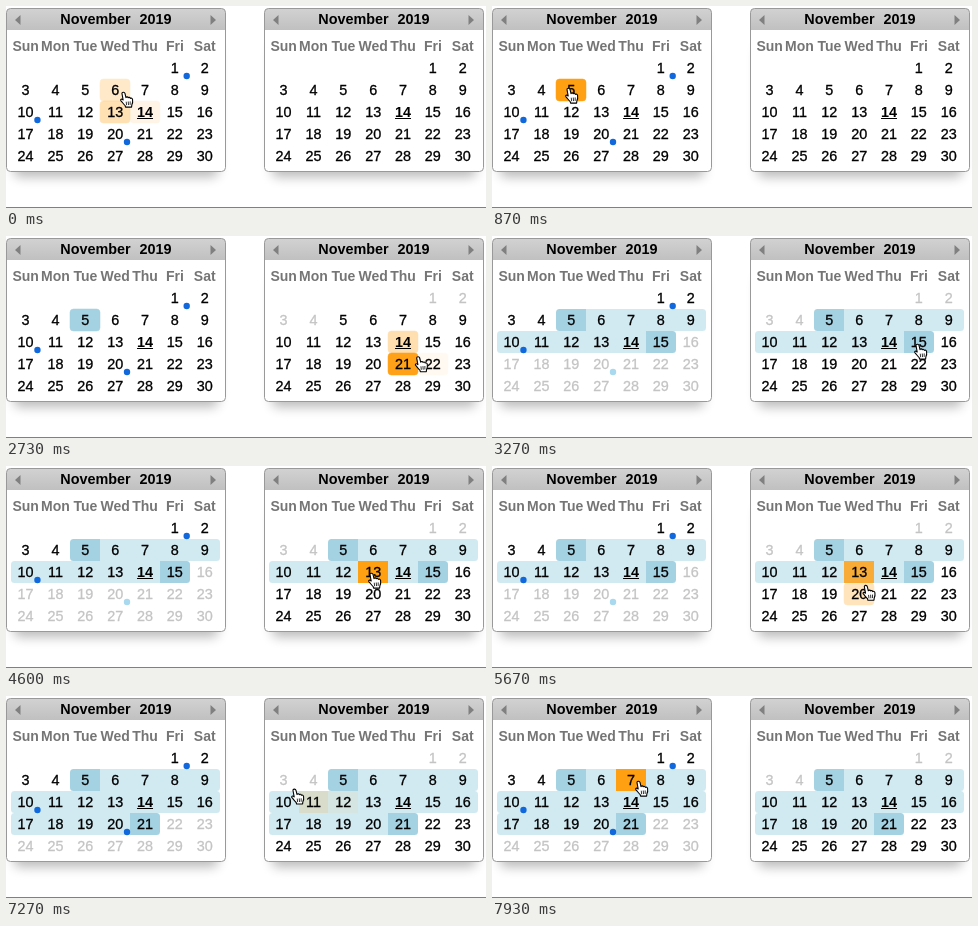
Animation of 480 by 202 pixels, one loop 8000 ms. Source, as an HTML page:

```html
<!DOCTYPE html>
<html lang="en">
<head>
<meta charset="utf-8">
<title>Date range picker</title>
<style>
  html, body { margin: 0; width: 100%; height: 100%; overflow: hidden; background: #fff; }
  svg { display: block; width: 480px; height: 202px; font: 14.4px "Liberation Sans", Arial, sans-serif; cursor: default; }
  text { text-anchor: middle; user-select: none; }
  .bold { font-weight: bold; }
  .day { stroke-width: .3; }
  .week { font-size: 14px; font-weight: bold; fill: #757575; }
</style>
</head>
<body>
<svg id="stage" viewBox="0 0 480 202">
  <defs>
    <linearGradient id="head" x2="0" y2="1">
      <stop offset="0" stop-color="#d2d2d2"/>
      <stop offset="1" stop-color="#c0c0c0"/>
    </linearGradient>
    <filter id="blur" x="-10%" y="-20%" width="120%" height="140%">
      <feGaussianBlur stdDeviation="6"/>
    </filter>
  </defs>
</svg>
<script>
const LOOP = 8000;
const FADE_IN = 180, FADE_OUT = 300, STEP = 10, LOOKBACK = 700;
const ORANGE = '#ff9f12', PICKED = '#a4d2e2', RANGE = '#d1eaf2';
const INK = '#000', MUTED = '#c4c4c4';
const OFFSETS = [0, 258];
const DAYS = 30, FIRST_COL = 5, TODAY = 14, MARKED = [1, 10, 20];

// pointer keys: time, x, y
const KEYS = [
  [-277, 235, 110], [-207, 154, 104], [-110, 124, 101], [-30, 119, 95],
  [0, 118, 87], [250, 106, 84], [500, 87, 82], [870, 77, 83],
  [1800, 77, 83], [1960, 362, 86], [2130, 379, 94], [2400, 384, 103],
  [2620, 402, 122], [2800, 418, 121], [3000, 426, 109],
  [4000, 426, 109], [4150, 400, 113], [4300, 379, 110], [4600, 366, 108],
  [5470, 366, 108], [5700, 376, 122], [5900, 392, 132], [6070, 407, 135],
  [6930, 407, 135], [7250, 300, 95], [7450, 172, 88], [7730, 147, 86]
];

const stage = document.getElementById('stage');

function add(parent, tag, attrs, label) {
  const el = document.createElementNS('http://www.w3.org/2000/svg', tag);
  for (const key in attrs) el.setAttribute(key, attrs[key]);
  if (label !== undefined) el.textContent = label;
  parent.appendChild(el);
  return el;
}

const colX = i => 4.7 + 29.85 * i;
const colMid = i => colX(i + .5);
const rowY = i => 51 + 22 * i;
const colOf = day => (day - 1 + FIRST_COL) % 7;
const rowOf = day => Math.floor((day - 1 + FIRST_COL) / 7);

function cellPath(day, roundLeft, roundRight) {
  // whole pixels keep neighbouring cells seamless
  const x = Math.round(colX(colOf(day))), w = Math.round(colX(colOf(day) + 1)) - x;
  const l = roundLeft ? 3.5 : 0, r = roundRight ? 3.5 : 0;
  return `M${x + l} ${rowY(rowOf(day))}h${w - l - r}q${r} 0 ${r} ${r}v${22 - 2 * r}` +
    `q0 ${r} ${-r} ${r}h${l + r - w}q${-l} 0 ${-l} ${-l}v${2 * l - 22}q0 ${-l} ${l} ${-l}z`;
}

function buildCalendar(offset, marked) {
  const g = add(stage, 'g', { transform: `translate(${offset})` });
  add(g, 'rect', { x: 8, y: 40, width: 204, height: 131, rx: 5, fill: '#000', opacity: .27, filter: 'url(#blur)' });
  add(g, 'rect', { x: .5, y: 2.5, width: 219, height: 163, rx: 4, fill: '#fff' });
  add(g, 'path', { d: 'M.5 24V6.5q0-4 4-4h211q4 0 4 4V24z', fill: 'url(#head)' });
  add(g, 'rect', { x: .5, y: 2.5, width: 219, height: 163, rx: 4, fill: 'none', stroke: '#999' });
  add(g, 'path', { d: 'M9 14l5.5-5v10zM210 14l-5.5-5v10z', fill: '#808080' });
  add(g, 'text', { x: 89.5, y: 18, class: 'bold' }, 'November');
  add(g, 'text', { x: 149.5, y: 18, class: 'bold' }, '2019');
  ['Sun', 'Mon', 'Tue', 'Wed', 'Thu', 'Fri', 'Sat'].forEach((name, i) =>
    add(g, 'text', { x: colMid(i), y: 45, class: 'week' }, name));

  const cells = [];
  for (let day = 1; day <= DAYS; day++) {
    cells[day] = {
      base: add(g, 'path', { 'stroke-opacity': .5 }),
      glow: add(g, 'path', { fill: ORANGE, 'stroke-opacity': .5 })
    };
  }
  for (let day = 1; day <= DAYS; day++) {
    const col = colOf(day), row = rowOf(day), mid = colMid(col);
    const today = day === TODAY;
    cells[day].label = add(g, 'text', { x: mid, y: rowY(row) + 16, class: today ? 'bold' : 'day' }, day);
    if (today) add(g, 'rect', { x: mid - 8, y: rowY(row) + 16 + 1, width: 16, height: 1 });
    if (marked && MARKED.includes(day)) {
      cells[day].dot = add(g, 'circle', { cx: colX(col + 1) - 3.1, cy: rowY(row) + 19, r: 3.2 });
    }
  }
  return cells;
}

const calendars = OFFSETS.map((offset, i) => buildCalendar(offset, i === 0));
add(stage, 'rect', { y: 201, width: 480, height: 1, fill: '#808080' });

const hand = add(stage, 'g', { 'stroke-linecap': 'round', 'stroke-linejoin': 'round' });
add(hand, 'path', {
  d: 'M-1.6 1C-1.8-.7 1-.9 1.4.8L2.4 5C2.8 4 4.4 4.1 4.7 5.2C5.2 4.5 6.6 4.7 6.8 5.8C7.6 5.2 8.8 5.7 9 7' +
     'C9.3 9 9.2 10.6 8.3 12.2L8 14.5H2L1.6 13C.2 11.8-1 10-2.6 8.2C-3.6 6.8-2 5.8-.4 7.4Z',
  fill: '#fff', stroke: '#000', 'stroke-width': 1.1
});
add(hand, 'path', { d: 'M2.7 9.5l.3 2.7M4.7 9.3l.2 2.8M6.6 9.2v2.7', fill: 'none', stroke: '#000', 'stroke-width': .8 });

// slope through key i on one axis; flat at holds and turns
function slope(i, axis) {
  if (i === 0 || i === KEYS.length - 1) return 0;
  const rate = k => (KEYS[k + 1][axis] - KEYS[k][axis]) / (KEYS[k + 1][0] - KEYS[k][0]);
  const a = rate(i - 1), b = rate(i);
  return a * b > 0 ? 2 * a * b / (a + b) : 0;
}

function pointer(t) {
  const next = KEYS.findIndex(key => key[0] > t);
  if (next < 1) return KEYS[next < 0 ? KEYS.length - 1 : 0].slice(1);
  const a = KEYS[next - 1], b = KEYS[next], span = b[0] - a[0];
  const u = (t - a[0]) / span, v = 1 - u;
  return [1, 2].map(axis =>
    a[axis] * v * v * (1 + 2 * u) + b[axis] * u * u * (3 - 2 * u) +
    span * u * v * (v * slope(next - 1, axis) - u * slope(next, axis)));
}

function cellAt([x, y]) {
  const side = x < 240 ? 0 : 1, local = x - OFFSETS[side];
  const row = Math.floor((y - rowY(0)) / 22);
  const col = Math.floor((local - colX(0)) / (colX(1) - colX(0)));
  const day = row * 7 + col - FIRST_COL + 1;
  return col < 0 || col > 6 || row < 0 || day < 1 || day > DAYS ? '' : side + ':' + day;
}

function hoverLevels(t) {
  const levels = {};
  for (let s = t - LOOKBACK; s <= t; s += STEP) {
    const over = cellAt(pointer(s));
    if (over) levels[over] = levels[over] || 0;
    for (const key in levels) {
      const change = key === over ? STEP / FADE_IN : -STEP / FADE_OUT;
      levels[key] = Math.min(1, Math.max(0, levels[key] + change));
    }
  }
  return levels;
}

function draw(t) {
  const start = t >= 1330 ? 5 : 0;
  const end = t < 3270 ? 0 : t < 6470 ? 15 : 21;
  const levels = hoverLevels(t);

  calendars.forEach((cells, side) => {
    for (let day = 1; day <= DAYS; day++) {
      const cell = cells[day], col = colOf(day);
      const off = side ? day < start : end > 0 && day > end;
      const inRange = end > 0 && day >= start && day <= end;
      const picked = start > 0 && (end ? day === start || day === end : !side && day === start);
      const shape = cellPath(day,
        !inRange || day === start || col === 0,
        !inRange || day === end || col === 6);
      const fill = picked ? PICKED : inRange ? RANGE : 'none';
      const ink = off ? MUTED : INK;
      cell.base.setAttribute('d', shape);
      cell.base.setAttribute('fill', fill);
      cell.base.setAttribute('stroke', inRange ? 'none' : fill);
      cell.glow.setAttribute('d', shape);
      cell.glow.setAttribute('stroke', inRange ? 'none' : ORANGE);
      cell.glow.setAttribute('opacity', off || picked ? 0 : levels[side + ':' + day] || 0);
      cell.label.setAttribute('fill', ink);
      if (day !== TODAY) cell.label.setAttribute('stroke', ink);
      if (cell.dot) cell.dot.setAttribute('fill', off ? '#a8d9ee' : '#1068dc');
    }
  });

  const [x, y] = pointer(t);
  hand.setAttribute('transform', `translate(${(x - .4).toFixed(2)} ${(y - .4).toFixed(2)})`);
}

const begin = performance.now();
function tick() {
  draw((performance.now() - begin) % LOOP);
  requestAnimationFrame(tick);
}
tick();
</script>
</body>
</html>
```
